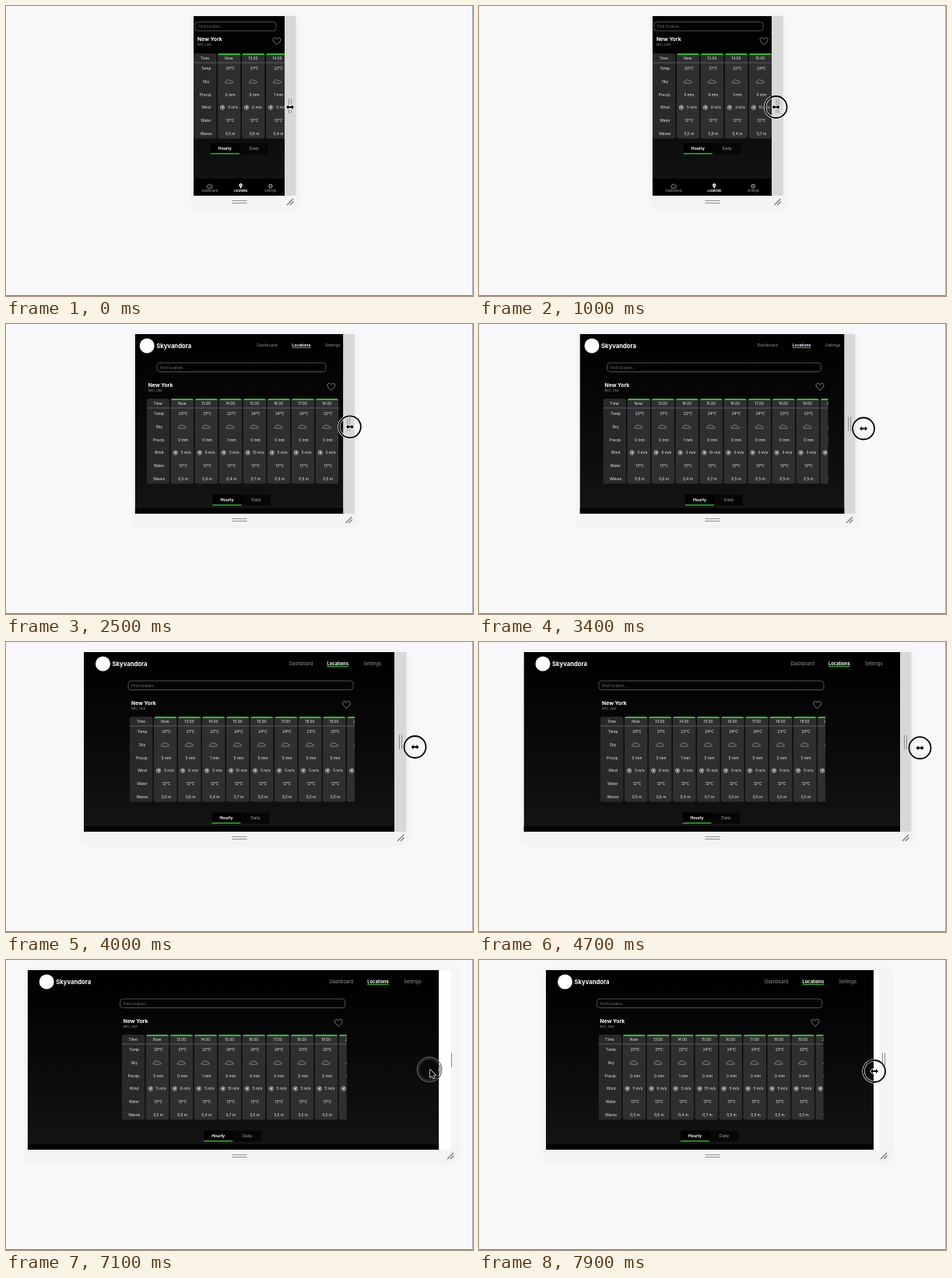
Write an HTML page with a canvas that moves like this. It is 600 px wide and 373 px high and loops after 8 s.

```html
<!DOCTYPE html>
<html lang="en">
<head>
<meta charset="utf-8">
<title>Responsive weather app</title>
<style>
html, body { margin: 0; width: 100%; height: 100%; overflow: hidden; background: #f8f7f9; }
canvas { display: block; width: 600px; height: 373px; }
</style>
</head>
<body>
<canvas></canvas>
<script>
const LOOP = 8000, STEP = 100, TOP = 13, BOTTOM = 244;
const GREEN = '#2fc42b', PAGE = '#f8f7f9';
const canvas = document.querySelector('canvas');
const ctx = canvas.getContext('2d');
const ratio = Math.max(1, window.devicePixelRatio || 1);
canvas.width = 600 * ratio;
canvas.height = 373 * ratio;

// time, app left, app right, drag handle, layout width, pointer x, pointer y
const keys = [
  [0, 241, 358, 365, 117, 365, 130],
  [500, 241, 358, 365, 117, 365, 130],
  [1300, 212, 387, 394.5, 175, 391.5, 130],
  [1700, 208, 390.5, 398.5, 182, 404.5, 131],
  [2200, 175, 424, 431, 249, 425.5, 132],
  [3100, 147, 452, 459, 305, 474.5, 133],
  [3400, 129.5, 469.5, 476, 339, 494, 134.5],
  [4000, 100, 499, 507, 397, 525.5, 135],
  [4700, 57.5, 541, 548, 476, 566.5, 136.2],
  [4900, 50, 549, 557, 494, 573.5, 136.5],
  [5400, 31, 568, 578, 537, 597, 137],
  [5800, 14, 585, 593, 571, 616, 138],
  [6200, 14, 585, 593, 571, 616, 138],
  [7100, 27.7, 556, 571, 521, 544, 141],
  [7900, 86, 507, 520, 414, 508, 143]
];
const labels = ['Time', 'Temp', 'Sky', 'Precip.', 'Wind', 'Water', 'Waves'];
const rowY = [6.5, 19.5, 36, 53, 69.5, 86.5, 103.5];
const temps = [20, 21, 22, 24, 24, 24, 23, 20, 20];
const winds = [5, 6, 3, 10, 5, 5, 5, 5, 5];
const waves = [5, 6, 4, 7, 5, 5, 5, 5, 5];

function stateAt(t) {
  let i = 0;
  while (i < keys.length - 2 && t >= keys[i + 1][0]) i++;
  const a = keys[i], b = keys[i + 1];
  const p = Math.min(1, (t - a[0]) / (b[0] - a[0]));
  const [, left, right, handle, width, px, py] = a.map((v, k) => v + (b[k] - v) * p);
  return { left, right, handle, width, px, py };
}

function rect(x, y, w, h, color) {
  ctx.fillStyle = color;
  ctx.fillRect(x, y, w, h);
}

function roundRect(x, y, w, h, radius) {
  ctx.beginPath();
  ctx.roundRect(x, y, w, h, radius);
}

function text(str, x, y, size, color = '#eee', align = 'center', weight = 400) {
  ctx.font = `${weight} ${size}px Inter, "Open Sans", sans-serif`;
  ctx.textAlign = align;
  ctx.textBaseline = 'alphabetic';
  ctx.fillStyle = color;
  ctx.fillText(str, x, y + size * 0.36);
}

function line(x1, y1, x2, y2, color, width = 1) {
  ctx.strokeStyle = color;
  ctx.lineWidth = width;
  ctx.beginPath();
  ctx.moveTo(x1, y1);
  ctx.lineTo(x2, y2);
  ctx.stroke();
}

function circle(x, y, r, color, width) {
  ctx.beginPath();
  ctx.arc(x, y, r, 0, Math.PI * 2);
  ctx.strokeStyle = ctx.fillStyle = color;
  ctx.lineWidth = width || 1;
  width ? ctx.stroke() : ctx.fill();
}

function shape(d, x, y, stroke, width, fill) {
  const path = new Path2D(d);
  ctx.save();
  ctx.translate(x, y);
  ctx.lineJoin = 'round';
  if (stroke) {
    ctx.strokeStyle = stroke;
    ctx.lineWidth = width;
    ctx.stroke(path);
  }
  if (fill) {
    ctx.fillStyle = fill;
    ctx.fill(path);
  }
  ctx.restore();
}

const heart = 'M0 4.8C-1.5 3.3-5 1-5-1.7C-5-4.7-1.4-5.2 0-2.3C1.4-5.2 5-4.7 5-1.7C5 1 1.5 3.3 0 4.8Z';
const cloud = 'M-4 2.2C-5.8 2-5.4 0-3.7 0C-3.2-2.3-.6-2.9.6-1.5C2.2-1.8 3.3-.8 3.4 0C5.6.3 5.4 2.2 4 2.2Z';
const pin = 'M0 3.2C-1-.1-2.2-.2-2.2-1.5A2.2 2.2 0 0 1 2.2-1.5C2.2-.2 1-.1 0 3.2Z';
const resizeArrow = 'M-5 0L-2-3V-1H2V-3L5 0L2 3V1H-2V3Z';
const pointerArrow = 'M0 0V10L2.4 7.8L4 11.3L5.6 10.5L4.1 7.2H7.2Z';

function drawSearch(x, y, w) {
  roundRect(x, y, w, 11.5, 3.5);
  ctx.strokeStyle = '#646467';
  ctx.lineWidth = 0.8;
  ctx.stroke();
  text('Find location...', x + 4, y + 6, 4.7, '#77777a', 'left');
}

function drawTitle(x, y, heartX) {
  text('New York', x, y, 6.8, '#fff', 'left', 700);
  text('NYC, USA', x, y + 7, 3.8, '#aaa', 'left');
  shape(heart, heartX, y + 2, '#999', 0.8);
}

function drawColumn(i, x, top) {
  const mid = x + 14.5, hour = i - 1;
  roundRect(x, top, 29.5, 109.5, 3);
  ctx.fillStyle = i ? '#2f2f31' : '#29292b';
  ctx.fill();
  if (!i) {
    labels.forEach((s, r) => text(s, mid + (r ? 1.5 : 0), top + rowY[r], 4.8));
    return;
  }
  ctx.save();
  ctx.clip();
  rect(x, top, 29.5, 1.9, GREEN);
  ctx.restore();
  const cell = (s, r, dx = 1.5) => text(s, mid + dx, top + rowY[r], 4.8);
  cell(hour ? `${12 + hour}.00` : 'Now', 0, 0);
  cell(`${temps[hour]}°C`, 1);
  shape(cloud, mid, top + rowY[2], '#bbb', 0.6);
  cell(`${hour === 2 ? 1 : 0} mm`, 3);
  circle(mid - 8.5, top + rowY[4], 2.7, '#ddd', 0.7);
  shape('M1.3-1.4L.5 1.5L-.2.2L-1.6-.3Z', mid - 8.5, top + rowY[4], '#eee', 0.5, '#eee');
  cell(`${winds[hour]} m/s`, 4, 5);
  cell('12°C', 5);
  cell(`0,${waves[hour]} m`, 6);
}

function drawTable(x, top, width) {
  ctx.save();
  ctx.beginPath();
  ctx.rect(x, top, width, 112);
  ctx.clip();
  for (let i = 0; i < 10; i++) drawColumn(i, x + 31 * i, top);
  line(x, top + 12, x + width, top + 12, '#68686a', 0.8);
  ctx.restore();
}

function drawTabs(mid, y) {
  rect(mid - 37, y, 74, 14, '#060607');
  rect(mid - 37, y, 37, 14, '#000');
  rect(mid - 37, y + 12.7, 37, 1.4, GREEN);
  text('Hourly', mid - 18.5, y + 6.5, 5.2, '#fff', 'center', 700);
  text('Daily', mid + 19, y + 6.5, 5.3, '#aaa');
}

function drawMobile({ left, right, width }) {
  drawSearch(left + 2, 20.5, width - 13);
  drawTitle(left + 5, 43, right - 10);
  drawTable(left, 61, right - left);
  drawTabs(left + width / 2 + 0.3, 176.5);
  rect(left, 222, right - left, 22, '#000');
  const [home, places, settings] = [0.178, 0.518, 0.844].map(f => left + width * f);
  ctx.beginPath();
  ctx.arc(home, 232.5, 3.3, Math.PI * 0.8, Math.PI * 2.2);
  ctx.closePath();
  ctx.strokeStyle = '#bbb';
  ctx.lineWidth = 0.7;
  ctx.stroke();
  line(home, 233, home + 1.5, 231, '#bbb', 0.7);
  shape(pin, places, 232, null, 0, '#fff');
  circle(places, 230.5, 0.7, '#000');
  circle(settings, 231.7, 1.7, '#bbb', 0.8);
  for (let i = 0; i < 6; i++) {
    const c = Math.cos(i * Math.PI / 3), s = Math.sin(i * Math.PI / 3);
    line(settings + 2 * c, 231.7 + 2 * s, settings + 3.1 * c, 231.7 + 3.1 * s, '#bbb', 1.2);
  }
  text('Dashboard', home, 238, 4, '#aaa');
  text('Locations', places, 238, 3.7, '#fff', 'center', 700);
  text('Settings', settings, 238, 4, '#aaa');
}

function drawDesktop({ left, right, width }) {
  const wide = width >= 375;
  const pad = wide ? 15 : 6, size = wide ? 5.9 : 5.1, y = wide ? 28 : 27;
  circle(left + pad + 9.5, 28, 9.5, '#fff');
  text('Skyvandora', left + pad + 21.5, 28.5, 7.7, '#fff', 'left', 700);

  const end = left + width - (wide ? 15 : 4);
  const [dash, place] = wide ? [118, 69.5] : [107, 62];
  text('Dashboard', end - dash, y, size, '#999', 'left');
  text('Locations', end - place, y, size * 0.98, '#fff', 'left', 700);
  text('Settings', end, y, size, '#999', 'right');
  rect(end - place, y + 3, wide ? 27.5 : 24, 1, GREEN);

  const mid = left + width / 2 + 3;
  const tableWidth = Math.min(289, width - 20);
  const searchWidth = Math.min(289, width * 0.81);
  const tableX = mid - tableWidth / 2 + 2;
  drawSearch(mid - searchWidth / 2, 50, searchWidth);
  drawTitle(tableX + 2, 78.5, tableX + tableWidth - 10.5);
  drawTable(tableX, 96, tableWidth);
  drawTabs(mid, 219.5);
  rect(left, 237, right - left, 7, '#020202');
}

function drawApp(state) {
  const { left, right, width } = state;
  ctx.save();
  ctx.beginPath();
  ctx.rect(left, TOP, right - left, BOTTOM - TOP);
  ctx.clip();
  const shade = ctx.createLinearGradient(0, TOP, 0, BOTTOM);
  shade.addColorStop(0, '#000');
  shade.addColorStop(0.25, '#040405');
  shade.addColorStop(1, '#141416');
  rect(left, TOP, right - left, BOTTOM - TOP, shade);
  (width < 240 ? drawMobile : drawDesktop)(state);
  ctx.restore();
}

function drawFrame({ left, right, handle }, hover) {
  ctx.save();
  ctx.shadowColor = 'rgba(0,0,0,.05)';
  ctx.shadowBlur = 10 * ratio;
  rect(left, TOP, handle + 7.5 - left, 246, '#f4f3f5');
  ctx.restore();
  rect(handle - 7.5, TOP, 15, BOTTOM - TOP, hover ? '#d8d8d9' : '#f5f4f6');
  for (const d of [-1.5, 1.5]) {
    line(handle + d, 119.5, handle + d, 138, '#8c8c8c', 1);
    line(290.5, 252 + d, 309.5, 252 + d, '#8c8c8c', 1);
  }
  line(handle - 4, 256, handle + 4, 248, '#777', 1.2);
  line(handle, 256, handle + 4.5, 251.5, '#777', 1.2);
  rect(right, TOP, Math.max(0, 599.5 - left - right), BOTTOM - TOP, hover ? '#d8d8d9' : '#fff');
}

function drawPointer({ px, py, right }, t) {
  const overApp = px < right - 3;
  ctx.save();
  ctx.globalAlpha = Math.min(1, t / 300);
  if (overApp) {
    circle(px, py, 15.8, '#666', 1.2);
    circle(px, py, 13.8, '#444', 1);
  } else {
    circle(px, py, 14, '#fff', 3.2);
    circle(px, py, 14, '#000', 1.8);
  }
  ctx.restore();
  if (overApp) shape(pointerArrow, px + 1, py, '#fff', 1.4, '#000');
  else shape(resizeArrow, px, py, '#fff', 1.6, '#000');
}

function render(now) {
  const t = Math.floor((now % LOOP) / STEP) * STEP;
  const state = stateAt(t);
  ctx.setTransform(ratio, 0, 0, ratio, 0, 0);
  rect(0, 0, 600, 373, PAGE);
  drawFrame(state, t < 5200);
  drawApp(state);
  drawPointer(state, t);
  rect(0, 372, 600, 1, '#777');
  rect(599, 0, 1, 373, '#aaa');
}

const start = performance.now();
function tick() {
  render(performance.now() - start);
  requestAnimationFrame(tick);
}
tick();
</script>
</body>
</html>
```
